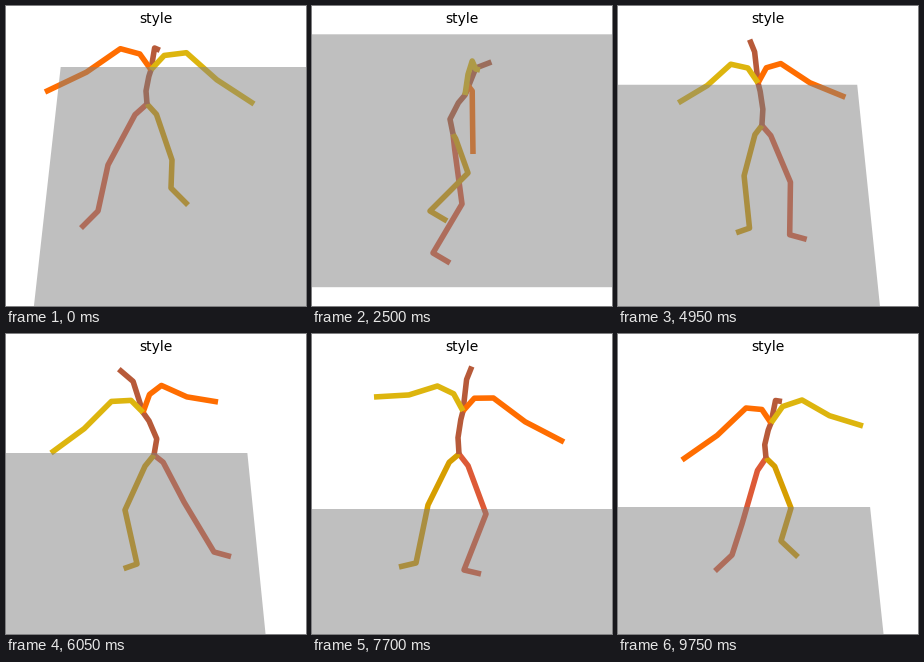
Animation, 300 px wide and 300 px high, one loop 9800 ms. Source, as a matplotlib script:

```python
import numpy as np
import matplotlib.pyplot as plt
from matplotlib.animation import FuncAnimation

SIZE, DPI = 300, 100
FRAMES, STEP = 196, 50
VANISH_X, VANISH_Y = 150, -790   # where the floor's side edges meet
FLOOR_WIDTH = 0.45               # gap between the side edges, as slope
AXES_TOP = 28.3

# right leg, left leg, spine, right arm, left arm
COLORS = ["#DD5A37", "#D69E00", "#B75A39", "#FF6D00", "#DDB50E"]

# time, lean, then points: hip, half shoulder span,
# right knee, ankle, wrist, left knee, ankle, wrist
POSES = np.array([
    (0, 4, 141, 98, -33, -2,
     102, 159, 92, 205, 39, 86, 166, 154, 165, 182, 248, 98),
    (1300, 7, 140, 116, -26, 10,
     128, 187, 111, 233, 67, 138, 167, 159, 142, 174, 245, 63),
    (2500, 12, 141, 128, 0, 15,
     150, 198, 121, 247, 161, 148, 156, 167, 118, 205, 168, 64),
    (3900, 3, 140, 118, 25, 7,
     168, 184, 139, 239, 242, 112, 132, 165, 130, 218, 75, 77),
    (6050, -11, 148, 121, 25, -8,
     178, 168, 208, 218, 212, 68, 119, 176, 131, 230, 45, 119),
    (7700, 4, 147, 120, 28, 6,
     174, 180, 152, 236, 252, 108, 116, 171, 104, 229, 62, 63),
    (9750, 5, 148, 124, -28, 4,
     124, 190, 114, 221, 64, 126, 173, 174, 163, 207, 245, 92)])
TIMES = POSES[:, 0]

# time, height of the back edge, slope of the right edge
FLOOR = np.array([
    (0, 61, .338), (1300, 30, .3146), (2500, 17, .25), (3900, 45, .19),
    (5100, 84, .096), (6050, 119, .1005), (7700, 175, .2),
    (8700, 184, .18), (9750, 173, .106)])


def smooth(x, y, t):
    """Cubic curve through the points (x, y)."""
    slope = np.gradient(y, x)
    i = min(np.searchsorted(x, t, side="right") - 1, len(x) - 2)
    h = x[i + 1] - x[i]
    u = (t - x[i]) / h
    ease = u * u * (3 - 2 * u)
    bend = u * (1 - u) ** 2 * slope[i] - u * u * (1 - u) * slope[i + 1]
    return y[i] + (y[i + 1] - y[i]) * ease + h * bend


def floor_corners(t):
    back, right = (smooth(FLOOR[:, 0], col, t) for col in FLOOR.T[1:])
    front = 302 + (back - 30) * 1.6
    back = max(back, AXES_TOP)
    left = right - FLOOR_WIDTH
    return [(VANISH_X + slope * (y - VANISH_Y), y)
            for slope, y in ((left, back), (right, back),
                             (right, front), (left, front))]


def stride(t):
    """Swing from -1 to 1 in whole strides between two key poses."""
    i = min(np.searchsorted(TIMES, t, side="right") - 1, len(TIMES) - 2)
    gap = TIMES[i + 1] - TIMES[i]
    return np.sin(2 * np.pi * round(gap / 1000) * (t - TIMES[i]) / gap)


def leg(hip, knee, ankle, span, facing, swing):
    lift = max(0, swing)
    knee = knee + (3 * swing, -4 * lift)
    ankle = ankle + (7 * swing, -12 * lift)
    socket = hip + .18 * (knee - hip) + .15 * span
    profile = max(0, 1 - abs(facing))
    toe = ankle + (17 * (np.clip(span[0] / 28, -1, 1) + profile),
                   10 + 6 * facing)
    return np.array([hip, socket, knee, ankle, toe])


def arm(chest, wrist, lean, span, swing):
    wrist = wrist + (0, 5 * swing)
    collar = chest + (.25 * lean, -15) + .37 * span
    shoulder = chest + (.6 * lean, -19) + span
    elbow = shoulder + .45 * (wrist - shoulder) + (0, 4)
    return np.array([chest, collar, shoulder, elbow, wrist])


def body(t):
    lean, *rest = (np.interp(t, TIMES, col) for col in POSES.T[1:])
    hip, span, *limb_points = np.reshape(rest, (-1, 2))
    right, left = limb_points[:3], limb_points[3:]
    facing = -span[0] / 28       # 1 towards the viewer, -1 away
    swing = stride(t)

    rise = -39 + 4 * facing
    chest = hip + (lean, rise)
    neck = chest + (.9 * lean, -27 + 4.5 * facing)
    head = neck + (1.3 * lean, -6 + 7 * facing)
    spine = np.array([hip, hip + (-.25 * lean, .38 * rise),
                      hip + (.45 * lean, .8 * rise), chest, neck, head])
    return [leg(hip, *right[:2], span, facing, swing),
            leg(hip, *left[:2], -span, facing, -swing),
            spine,
            arm(chest, right[2], lean, span, -swing),
            arm(chest, left[2], lean, -span, swing)]


fig = plt.figure(figsize=(SIZE / DPI, SIZE / DPI), dpi=DPI, facecolor="white")
ax = fig.add_axes([0, 0, 1, 1])
ax.set_xlim(0, SIZE)
ax.set_ylim(SIZE, 0)
ax.axis("off")
fig.suptitle("style", fontsize=10)

limbs = [ax.plot([], [], color=c, lw=4, solid_capstyle="butt",
                 solid_joinstyle="round", zorder=2)[0] for c in COLORS]
floor = plt.Polygon(floor_corners(0), facecolor=(.5, .5, .5, .5),
                    edgecolor="none", lw=0, zorder=3)
ax.add_patch(floor)


def draw(frame):
    t = frame * STEP
    floor.set_xy(floor_corners(t))
    for limb, chain in zip(limbs, body(t)):
        limb.set_data(chain[:, 0], chain[:, 1])
    return [*limbs, floor]


anim = FuncAnimation(fig, draw, frames=FRAMES, interval=STEP, repeat=True,
                     repeat_delay=0)
plt.show()
```
